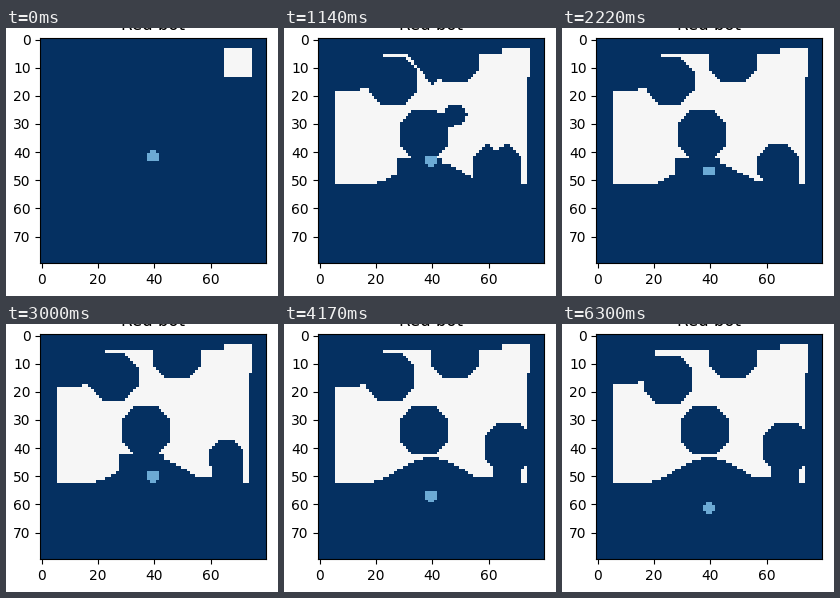
A matplotlib script that plays this animation: 272 px wide and 268 px high, repeating every 7200 ms.

```python
import numpy as np
import matplotlib.pyplot as plt
from matplotlib.animation import FuncAnimation
from matplotlib.colors import ListedColormap
from matplotlib.path import Path

W, H, DPI = 272, 268, 100
N = 80                     # grid cells per side
STEP, LOOP = 30, 7200      # ms
SEA, BOT, LAND = 0, 1, 2
R = 8.6                    # radius of the round obstacles

gx, gy = np.meshgrid(np.arange(N) + 0.5, np.arange(N) + 0.5)
cells = np.column_stack([gx.ravel(), gy.ravel()])

# Two blobs, each growing from a point near its straight side
LEFT = [(10.8, 19), (14.5, 19), (25.8, 32.8), (24.4, 43), (15, 51),
        (8.8, 51), (9.8, 29)]
RIGHT = [(66.2, 19.5), (69.2, 19.5), (70.2, 37), (62.2, 40), (58, 35),
         (58, 29.5)]
ROOTS = [(LEFT, (10, 38)), (RIGHT, (69, 30))]


def ease(t, t0, t1, a=0.0, b=1.0):
    return a + (b - a) * np.clip((t - t0) / (t1 - t0), 0, 1)


def disc(cx, cy, r):
    return (gx - cx) ** 2 + (gy - cy) ** 2 < r * r


def octagon(cx, cy, r):
    dx, dy = abs(gx - cx), abs(gy - cy)
    return np.maximum(np.maximum(dx, dy), (dx + dy) / np.sqrt(2)) < r


def blobs(s):
    m = np.zeros((N, N), bool)
    for poly, root in ROOTS:
        pts = np.array(root) + s * (np.array(poly) - root)
        m |= Path(pts).contains_points(cells).reshape(N, N)
    return m


def coast(t):
    """Outer border of the bay: shelf on top, a smooth hill below."""
    shelf = ease(t, 5200, 6150, 19, 18)
    strip = ease(t, 5200, 6150, 22.8, 20.6)
    top = np.select([gx < 15.5, gx < strip, gx < 65],
                    [shelf, shelf - 1.5, 6], 4)
    right = np.where(gy < 14, 75, 74)

    flat = ease(t, 1560, 3000, 52, 53)
    hill = np.cos(np.pi * np.clip((gx - 40) / 23, -1, 1))
    shore = flat - (flat - 44) * (1 + hill) / 2
    shore = np.where((gx > 40) & (gx < 72), np.minimum(shore, 50.8), shore)
    return (gx > 6) & (gx < right) & (gy > top) & (gy < shore)


def obstacles(t):
    m = octagon(ease(t, 1560, 4100, 26.5, 25.5), ease(t, 5200, 6150, 15.5, 16.5), R)
    m |= octagon(48.5, 7.5, R)
    m |= octagon(ease(t, 5200, 6150, 37.5, 38.5), 34.5, R)

    # spot that melts away beside the middle obstacle
    spot = ease(t, 1500, 2100, 1, 0)
    m |= disc(48.6, 27.5, 4 * spot) | disc(45.5, 29.5, 3 * spot)

    # ledge left of the bot, then the hump that turns into a full obstacle
    if t < 3300:
        m |= (abs(gx - 36) < 8) & (gy > 43)
    keys = [1560, 3000, 3450]
    cx = np.interp(t, keys, [63.5, 66, 67.5])
    cy = np.interp(t, keys, [46.5, 44, 40.5])
    m |= octagon(cx, cy, np.interp(t, keys, [8.6, 6, R]))
    m |= (gx > cx - 5.5) & (gx < 72) & (gy > cy)
    return m


def land(t):
    return coast(t) & ~obstacles(t)


box = (gx > 65) & (gx < 75) & (gy > 4) & (gy < 14)
full = blobs(1)
seeds = cells[full.ravel()]
gap = np.array([np.hypot(*(seeds - c).T).min() for c in cells]).reshape(N, N)
reach = gap[land(1300)].max()


def white(t):
    if t < 510:
        return box
    if t <= 810:
        return box | blobs(ease(t, 480, 810))
    return box | full | (land(t) & (gap <= reach * ease(t, 810, 1230))) \
        if t < 1260 else land(t)


def bot(t):
    cx = 40 - np.exp(-((t - 5160) / 250) ** 2)
    cy = np.interp(t, [510, 1560, 3000, 4170, 6150],
                   [42.3, 44.7, 50.8, 57.8, 62])
    return disc(cx, cy, 2)


def grid(t):
    g = np.where(white(t), LAND, SEA)
    g[bot(t)] = BOT
    return g


fig = plt.figure(figsize=(W / DPI, H / DPI), dpi=DPI, facecolor="white")
left, bottom, side = 34.3, 32.6, 225.3
ax = fig.add_axes([left / W, bottom / H, side / W, side / H])
img = ax.imshow(grid(0), cmap=ListedColormap(["#053061", "#6caad5", "#f6f6f6"]),
                vmin=0, vmax=2, interpolation="nearest")
ax.set_xticks(range(0, N, 20))
ax.set_yticks(range(0, N, 10))
ax.set_title("Red bot")


def update(i):
    img.set_data(grid(i * STEP))
    return [img]


anim = FuncAnimation(fig, update, frames=LOOP // STEP, interval=STEP,
                     repeat=True, repeat_delay=0, blit=False)
plt.show()
```
